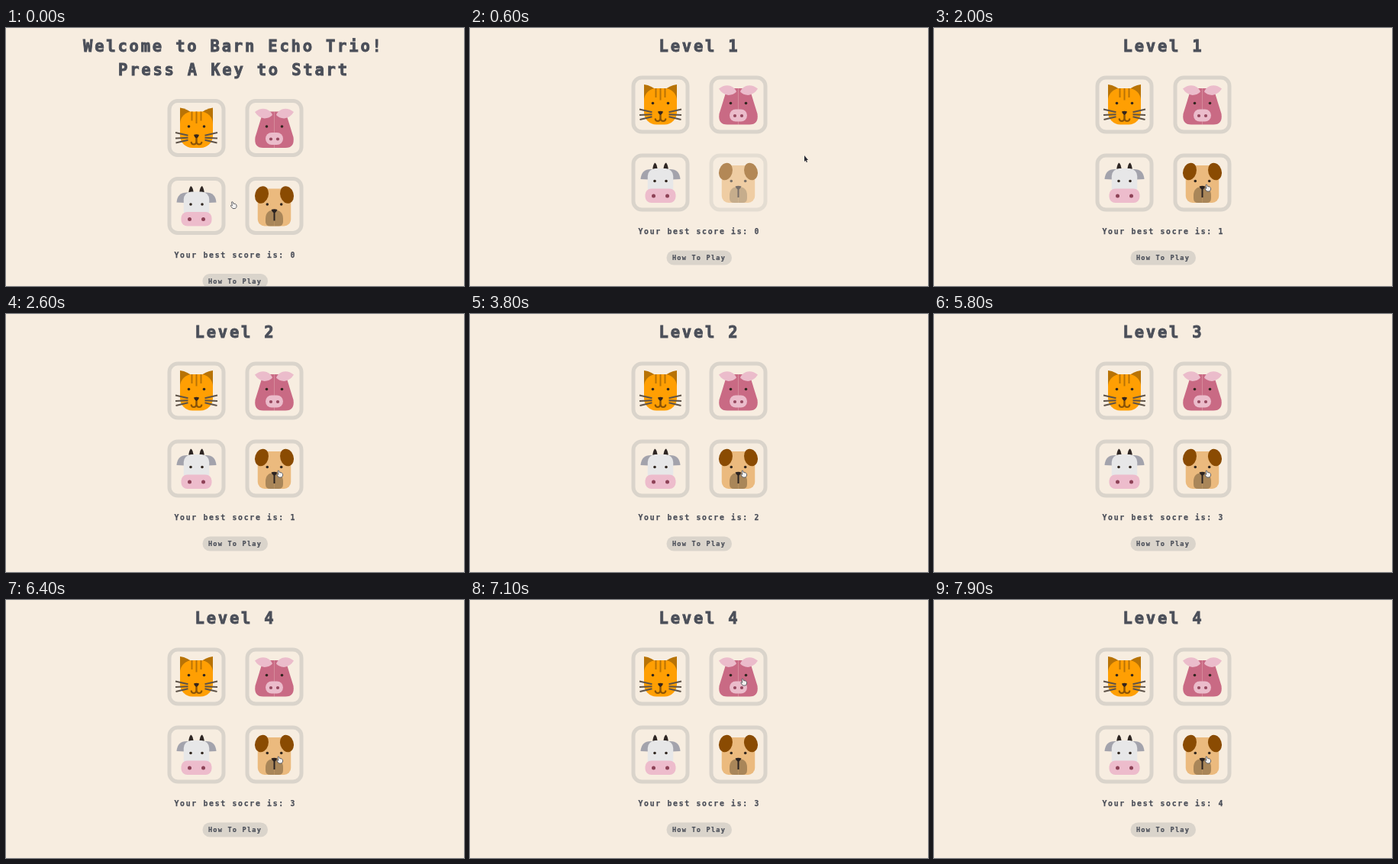
Recreate the animation shown at these times as an HTML page. Size 600 by 338 pixels, loop 8000 ms.

```html
<!DOCTYPE html>
<html lang="en">
<head>
<meta charset="utf-8">
<title>Barn Echo Trio</title>
<style>
  html, body { margin: 0; width: 100%; height: 100%; overflow: hidden; background: #f7ede0; }
  svg { display: block; width: 100vw; height: 100vh; }
  text { font-family: "DejaVu Sans Mono", "Liberation Mono", monospace; font-weight: bold; fill: #4b4f59; stroke: #4b4f59; white-space: pre; }
  .big { font-size: 20.5px; letter-spacing: 2.8px; stroke-width: .9px; }
  .score { font-size: 9.8px; letter-spacing: 1.7px; stroke-width: .25px; }
  .help { font-size: 8.6px; letter-spacing: 1.2px; stroke-width: .2px; }
  .frame { fill: none; stroke: #dad4cb; stroke-width: 5; }
  .pill { fill: #dad4cb; }
  .line { fill: none; stroke-width: 2; }
</style>
</head>
<body>
<svg viewBox="0 0 600 338">
  <text id="title" class="big" y="31"></text>
  <text id="prompt" class="big" x="147" y="62">Press A Key to Start</text>
  <g id="board">
    <g id="animals"></g>
    <text id="score" class="score" x="220.5" y="270"></text>
    <rect class="pill" x="257.5" y="291.5" width="85.5" height="19" rx="9.5"/>
    <text class="help" x="265" y="304">How To Play</text>
  </g>
  <path id="arrow" fill="#282a35" d="M0-4V4L1.7 2.5L2.8 5L4 4.5L2.9 2H5Z"/>
  <path id="hand" fill="#f4f2f0" stroke="#55565c" stroke-width=".9" stroke-linejoin="round"
    d="M-2.5-4Q-1.5-5-.8-4L0-1.8Q3-2.5 4 0V2.5L2.5 4.5H-1L-3.5 1.5Q-4 0-2.5 .2L-1.6 .8Z"/>
</svg>

<script>
const $ = id => document.getElementById(id);
const LOOP = 8000, STEP = 100;

// Shapes are drawn around the middle of their button.
const shape = (d, fill) => `<path d="${d}" fill="${fill}"/>`;
const line = (d, color) => `<path class="line" d="${d}" stroke="${color}"/>`;
const dot = (x, y, r, fill) => `<circle cx="${x}" cy="${y}" r="${r}" fill="${fill}"/>`;
const box = (y, w, h, r, fill) => `<rect x="${-w / 2}" y="${y}" width="${w}" height="${h}" rx="${r}" fill="${fill}"/>`;
const both = half => half + `<g transform="scale(-1 1)">${half}</g>`;
const eyes = x => both(dot(x, -2, 1.8, '#30261f'));

const animals = {
  cat: { col: -1, row: -1, art:
    both(shape('M-21.5-26.5Q-11-25-4-18L-21.5 4Z', '#b87306')) +
    box(-21.5, 43, 47.5, 16, '#ff9f03') +
    line('M0-21.5V-6', '#b87306') + both(line('M-6-21.5V-9.5', '#b87306')) +
    both(line('M-27.5 6L-11 9.7M-27.5 13.5L-11 12.7M-27 19.5L-11 15.7', '#5e5349')) +
    both(line('M0 10V18Q-.5 21.5-3.5 21.5T-7 18', '#8a5407')) +
    shape('M-3.5 9Q0 7.5 3.5 9Q3 12 0 13.5Q-3 12-3.5 9Z', '#35251c') + eyes(10) },
  pig: { col: 1, row: -1, art:
    both(shape('M0-21.5H-8.5Q-14.5-21.5-16.5-15.5L-25 12Q-27 26-14.5 26H0Z', '#c96a84')) +
    both(shape('M-25.5-21Q-18-27-10-24.5Q-4-22-2.5-17Q-6-13-13-12.5Q-21-13.5-25.5-21Z', '#ebbccb')) +
    box(6, 23, 16, 8, '#ebbccb') + both(dot(4.5, 14.5, 2.1, '#96485f')) + eyes(10) },
  cow: { col: -1, row: 1, art:
    both(shape('M-26-4.5Q-25-17.5-12.5-17.5H-5.500V-3.500Z', '#a3a3ac')) +
    both(shape('M-10.5-13Q-10.5-22-7.5-26Q-4-25-3.5-13Z', '#2f2724')) +
    box(-18.5, 33.5, 36, 10, '#e7e7e8') + box(8, 40, 18.5, 8, '#edbccc') +
    both(dot(9, 17.500, 2.5, '#8e4257')) + eyes(7.5) },
  dog: { col: 1, row: 1, art:
    box(-22.500, 43.5, 49, 9, '#ebba7e') +
    both('<ellipse rx="8.7" ry="11.5" transform="translate(-16.5 -14.5) rotate(18)" fill="#8a4b02"/>') +
    both(shape('M0 5.5Q-11.500 5.5-11.500 17V20.500Q-11.500 26.500-5.500 26.500H0Z', '#a98659')) +
    line('M0 5V19.500', '#2b2321') + shape('M-4 5Q0 3.5 4 5Q3 8 0 9.500Q-3 8-4 5Z', '#2b2321') + eyes(9.2) }
};

const center = ({ col, row }) => [300.5 + 51 * col, 151.5 + 51 * row];
for (const [id, a] of Object.entries(animals))
  $('animals').innerHTML += `<g id="${id}" transform="translate(${center(a)})">
    <rect class="frame" x="-35.5" y="-35.5" width="71" height="71" rx="11"/>${a.art}</g>`;

// Level n plays one more animal of the tune; the player then clicks through the first n.
const tune = ['dog', 'pig', 'cat', 'dog'], BEAT = 350;
const levels = [[500, 1400], [2300, 2650], [3900, 4650], [6400, 6750]]
  .map(([start, click], i) => ({ start, click, last: click + i * BEAT, animal: tune[i] }));

// Cursor stops: time, x, y
const stops = [[0, 298, 232], [600, 438, 171]];
levels.forEach(({ click }, i) => {
  [...tune.slice(0, i + 1), 'dog'].forEach((id, k) => {
    const [x, y] = center(animals[id]);
    stops.push([click + k * BEAT, x + 7, y + 7]);
  });
});

function cursorAt(t) {
  const i = stops.findIndex(s => s[0] > t);
  const [t0, x0, y0] = stops[i - 1], [t1, x1, y1] = stops[i];
  const u = (t - t0) / (t1 - t0), k = u * u * (3 - 2 * u);
  return [x0 + (x1 - x0) * k, y0 + (y1 - y0) * k];
}

// Opacity jumps down one step after the start and recovers.
const blink = d => d < STEP ? 1 : Math.min(1, 0.62 + (d - STEP) / 400);

function draw(t) {
  const level = levels.filter(l => t >= l.start).length;
  const score = levels.filter(l => t >= l.last).length;

  $('title').textContent = level ? 'Level ' + level : 'Welcome to Barn Echo Trio!';
  $('title').setAttribute('x', level ? 247.5 : 101);
  $('prompt').style.display = level ? 'none' : '';
  $('board').setAttribute('transform', `translate(0 ${level ? 0 : 30.5})`);
  $('score').textContent = `Your best ${score ? 'socre' : 'score'} is: ${score}`;

  const now = levels[level - 1];
  for (const id in animals)
    $(id).setAttribute('opacity', now && now.animal === id ? blink(t - now.start) : 1);

  const [x, y] = cursorAt(t);
  for (const id of ['arrow', 'hand']) {
    $(id).setAttribute('transform', `translate(${x} ${y})`);
    $(id).style.display = (id === 'arrow') === (x > 390) ? '' : 'none';
  }
}

const begin = performance.now();
function tick() {
  const t = (performance.now() - begin) % LOOP;
  draw(Math.floor(t / STEP) * STEP);
  requestAnimationFrame(tick);
}
tick();
</script>
</body>
</html>
```
